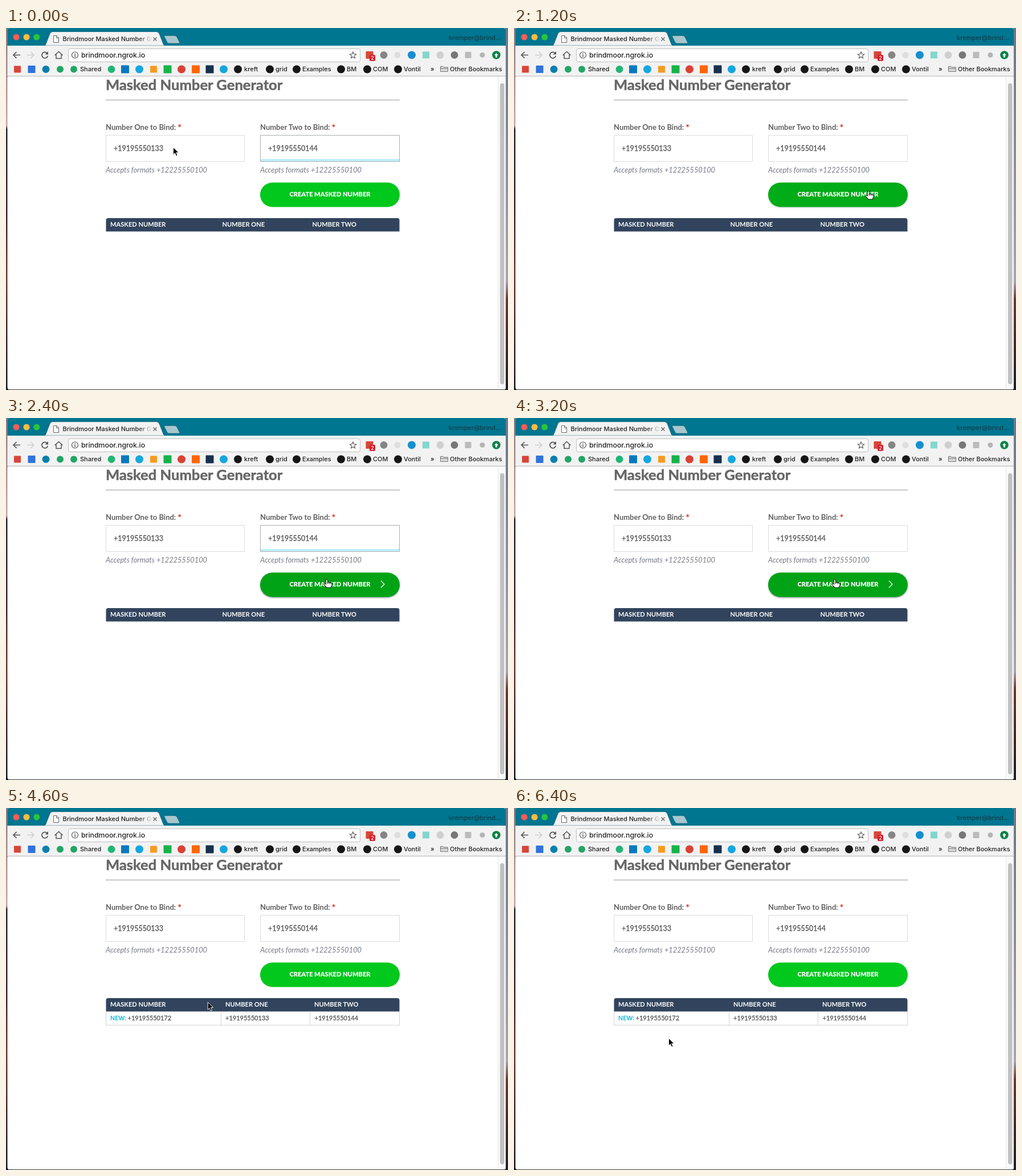
These frames come from a looping animation (881x636 px, 6.5 s). An HTML page:

```html
<!DOCTYPE html>
<html lang="en">
<head>
<meta charset="utf-8">
<title>Masked Number Generator</title>
<style>
  html, body { margin: 0; width: 100%; height: 100%; overflow: hidden; background: #fff; }
  svg { display: block; width: 100vw; height: 100vh; }
  .ui { font: 500 11px Inter, sans-serif; fill: #222; }
  .page { font: 12.5px Lato, sans-serif; fill: #555; }
  .title { font-size: 25.6px; font-weight: 700; fill: #666; stroke: #666; stroke-width: .5; }
  .label { font-size: 13px; font-weight: 700; fill: #606060; }
  .hint { font-size: 12.8px; font-style: italic; fill: #757c88; }
  .head { font-size: 11.1px; font-weight: 700; fill: #fff; }
  .value, .cell { stroke: #555; stroke-width: .3; }
  .cell { font-size: 11px; }
  .line { fill: none; stroke: #555; stroke-width: 1.7; }
</style>
</head>
<body>
<svg viewBox="0 0 881 636">
  <defs>
    <linearGradient id="leftDesk" x2="0" y2="1">
      <stop offset="0" stop-color="#8f7d80"/><stop offset=".27" stop-color="#c9a5a3"/>
      <stop offset=".28" stop-color="#272735"/><stop offset=".5" stop-color="#40262b"/>
      <stop offset=".68" stop-color="#713b32"/><stop offset="1" stop-color="#171b27"/>
    </linearGradient>
    <linearGradient id="rightDesk" x2="0" y2="1">
      <stop offset="0" stop-color="#68778d"/><stop offset=".7" stop-color="#a9a3b7"/>
      <stop offset=".75" stop-color="#70382f"/><stop offset=".88" stop-color="#48292a"/>
      <stop offset="1" stop-color="#1c2230"/>
    </linearGradient>
    <linearGradient id="tabFade">
      <stop offset="0" stop-color="#f2f2f2" stop-opacity="0"/><stop offset="1" stop-color="#f2f2f2"/>
    </linearGradient>
    <filter id="blur" x="-10%" y="-30%" width="120%" height="160%"><feGaussianBlur stdDeviation="1.2"/></filter>
  </defs>

  <!-- Window frame -->
  <rect width="4" height="636" fill="url(#leftDesk)"/>
  <rect x="876" width="5" height="636" fill="url(#rightDesk)"/>
  <rect x="2.5" y="84" width="874.5" height="551" rx="4" fill="#fff"/>
  <path d="M2.5 32V4q0-4 4-4H873q4 0 4 4V32Z" fill="#007690"/>
  <path d="M66 31Q69 31 70 28L77 10Q78.500 6.500 82 6.500H264Q267.500 6.500 269 10L276 28Q277 31 280 31Z" fill="#f2f2f2" stroke="#0b5c70" stroke-width=".8"/>
  <rect x="2.5" y="31" width="874.5" height="53" fill="#f2f2f2"/>
  <path d="M3 84.5H877" stroke="#b5b5b5"/>
  <path d="M4 635.5H876" stroke="#333"/>
  <rect x="863" y="85" width="14" height="549" fill="#fafafa"/>
  <path d="M863.5 85V634" stroke="#e7e7e7"/>
  <rect x="867" y="97" width="7.5" height="529" rx="3.7" fill="#c1c1c1"/>

  <!-- Tab strip -->
  <circle cx="18" cy="16" r="5.5" fill="#fc5b57"/>
  <circle cx="36" cy="16" r="5.5" fill="#fdbc40"/>
  <circle cx="53.7" cy="16" r="5.5" fill="#28c43c"/>
  <path d="M279 13.500H296Q299 13.500 300 16L304.500 25Q305.500 27 303 27H286Q283.500 27 282.500 24.500L278 15.500Q277 13.500 279 13.500Z" fill="#a8c6ce" stroke="#0b5c70" stroke-width=".6"/>
  <path d="M83.500 13.500H89L92.500 17V25.500H83.500ZM88.500 13.500V17.500H92.500" fill="#fff" stroke="#666"/>
  <g class="ui">
    <text x="99.5" y="23">Brindmoor Masked Number Ge</text>
    <rect x="232" y="10" width="25" height="17" fill="url(#tabFade)"/>
    <rect x="257" y="10" width="6" height="17" fill="#f2f2f2"/>
    <path d="M258.500 16.500L264.500 22.500M264.500 16.500L258.500 22.500" stroke="#666" stroke-width="1.4"/>
    <text x="777" y="20.500" style="fill:#123f4b">kremper@brind…</text>
  </g>

  <!-- Toolbar -->
  <path class="line" d="M25 47.500H13M18.500 42L13 47.500L18.500 53"/>
  <path class="line" d="M37 47.500H49M43.500 42L49 47.500L43.500 53" style="stroke:#cfcfcf"/>
  <path class="line" d="M72.500 44.500A5.300 5.300 0 1 0 73.300 49"/>
  <path d="M74 41V46.500H68.500Z" fill="#555"/>
  <path class="line" d="M85.500 48L92.500 41.500L99.500 48M88 46.500V53.500H97V46.500" style="stroke-width:1.5"/>
  <rect x="109.500" y="36.500" width="512" height="23" rx="3" fill="#fff" stroke="#bebebe"/>
  <circle class="line" cx="121" cy="47.500" r="5.500" style="stroke-width:1.2"/>
  <path d="M121 46.500V51M121 44V45.500" stroke="#555" stroke-width="1.4"/>
  <text class="ui" x="132" y="52" style="font-size:12.3px">brindmoor.ngrok.io</text>
  <path class="line" id="star" style="stroke-width:1.1"/>
  <g id="icons"></g>
  <rect x="638" y="47" width="10" height="11" rx="2" fill="#d4202c"/>
  <text class="ui" x="640.200" y="56" style="fill:#fff;font-size:9px">2</text>
  <path d="M860.500 44L864 48H862V51.500H859V48H857Z" fill="#fff"/>
  <g class="ui" id="bookmarks"></g>
  <path d="M762.500 76.500V67.500H767L768.500 69H775.500V76.500ZM762.500 71H775.500" fill="#d8d8d8" stroke="#777"/>

  <!-- Page -->
  <g class="page">
    <text class="title" x="175" y="109">Masked Number Generator</text>
    <path d="M175 126.500H691" stroke="#999"/>
    <g id="fields"></g>
    <g id="focus">
      <rect x="446.500" y="188.500" width="244" height="46" fill="none" stroke="#aaaeb2"/>
      <rect x="447" y="230" width="243" height="4" fill="#bff0fa"/>
    </g>
    <path id="caret" stroke="#333"/>
    <rect id="shadow" x="446" y="273" width="245" height="43" rx="21.500" fill="#345" filter="url(#blur)"/>
    <rect id="button" x="446" y="271.500" width="245" height="43" rx="21.500"/>
    <text x="568.500" y="296" text-anchor="middle" style="font-size:11.1px;font-weight:900;fill:#fff">CREATE MASKED NUMBER</text>
    <path id="chevron" d="M658 286L664 292L658 298" fill="none" stroke="#fff" stroke-width="1.200"/>
    <path d="M175.500 357.500V338Q175.500 334 179.500 334H686.500Q690.500 334 690.500 338V357.500Z" fill="#32445d"/>
    <text class="head" x="183" y="349">MASKED NUMBER</text>
    <text class="head" id="headOne" y="349">NUMBER ONE</text>
    <text class="head" id="headTwo" y="349">NUMBER TWO</text>
    <g id="row">
      <path d="M175.500 357.500V381.500H690.500V357.500M377.500 357.500V381.500M533.500 357.500V381.500" fill="none" stroke="#d5d5d5"/>
      <rect id="selection" x="213" y="362" width="79" height="15" fill="#91d8f8"/>
      <text x="183" y="373" style="font-size:10.6px;font-weight:700;fill:#08b9df">NEW:</text>
      <text class="cell" x="213.500" y="373">+19195550172</text>
      <text class="cell" x="385" y="373">+19195550133</text>
      <text class="cell" x="541.500" y="373">+19195550144</text>
    </g>
  </g>

  <!-- Pointer -->
  <g id="pointer">
    <circle id="ring" r="13.200" fill="#fff" fill-opacity=".25" stroke="#000" stroke-width="2.800"/>
    <path id="arrow" transform="translate(.5 .5)" d="M0 0V13L3 10.300L5.200 15.300L7.500 14.300L5.300 9.400H9.500Z" fill="#000" stroke="#fff" stroke-width=".9"/>
    <path id="hand" d="M-1.500 1.500Q0-1 1.500 1.500V6Q3 4.500 4.200 6Q5.500 5 6.700 6.700Q8.500 6 9 8V11L7 15H0L-5 9.500Q-5 7-2.500 8L-1.500 9ZM1.500 6V8.500M4.200 6V8.500M6.700 6.700V8.500" fill="#fff" stroke="#111" stroke-width="1.100"/>
    <path id="beam" d="M-3-7Q0-7 0-5Q0-7 3-7M0-5V5M-3 7Q0 7 0 5Q0 7 3 7M-1.500 2H1.500" fill="none" stroke="#222" stroke-width="1.200"/>
  </g>
</svg>
<script>
const $ = id => document.getElementById(id);
const show = (id, visible) => $(id).setAttribute('visibility', visible ? 'visible' : 'hidden');
const set = (id, attrs) => { for (const key in attrs) $(id).setAttribute(key, attrs[key]); };
const clamp = v => Math.min(1, Math.max(0, v));
const within = (t, spans) => spans.some(([from, to]) => t >= from && t < to);

const icon = ([shape, x, color, size = 13], y) => shape === 'o'
  ? `<circle cx="${x}" cy="${y}" r="${size / 2}" fill="${color}"/>`
  : `<rect x="${x - size / 2}" y="${y - size / 2}" width="${size}" height="${size}" rx="1" fill="${color}"/>`;

const extensions = [
  ['s', 638, '#d8453a'], ['o', 663, '#858585'], ['o', 687, '#dedede', 11], ['o', 712, '#168fcf', 14],
  ['s', 737, '#83d6ce', 12], ['o', 762, '#d0d0d0'], ['o', 787, '#777'], ['s', 811, '#bbb', 11],
  ['o', 836, '#b5b5b5', 9], ['o', 860.5, '#078347', 14.5]
];
const favicons = [
  ['s', 20, '#d8453a', 12], ['s', 45, '#2f73dc'], ['o', 70, '#087fae'], ['o', 95, '#22a565', 12],
  ['o', 119, '#22a565', 12], ['o', 185, '#20b575'], ['s', 209, '#0879bf', 14], ['o', 234, '#16a6df', 14],
  ['s', 259, '#f69b20', 12], ['s', 283.5, '#16b34a', 14], ['o', 308, '#da4135', 14], ['s', 333, '#ff6600', 14],
  ['s', 357.5, '#17304d', 14], ['o', 382, '#16a6df', 14],
  ...[407, 463, 510, 588, 634, 688].map(x => ['o', x, '#161616', 14])
];
const bookmarks = [
  [130, 'Shared'], [418, 'kreft'], [473, 'grid'], [520, 'Examples'], [598, 'BM'],
  [644, 'COM'], [698, 'Vontil'], [745, '»'], [779, 'Other Bookmarks']
];
$('icons').innerHTML = extensions.map(e => icon(e, 47.5)).join('');
$('bookmarks').innerHTML = favicons.map(f => icon(f, 72.5)).join('') +
  bookmarks.map(([x, name]) => `<text x="${x}" y="76">${name}</text>`).join('');

const starPoints = Array.from({ length: 10 }, (_, i) => {
  const angle = i * Math.PI / 5 - Math.PI / 2, radius = i % 2 ? 2.7 : 6;
  return `${609 + radius * Math.cos(angle)} ${48 + radius * Math.sin(angle)}`;
});
set('star', { d: `M${starPoints.join('L')}Z` });

const field = (x, width, name, value) => `
  <text class="label" x="${x}" y="178.500">Number ${name} to Bind: <tspan fill="#e2351f" font-size="15" font-weight="900" dy="1">*</tspan></text>
  <rect x="${x + .5}" y="188.500" width="${width}" height="46" fill="#fff" stroke="#dcdcdc"/>
  <text class="value" id="value${name}" x="${x + 14}" y="215.500">${value}</text>
  <text class="hint" x="${x}" y="253.500">Accepts formats +12225550100</text>`;
$('fields').innerHTML = field(175, 243, 'One', '+19195550133') + field(446, 244, 'Two', '+19195550144');

// Pointer stops: time, x, y
const path = [
  [0, 293, 209], [350, 293, 209], [950, 600, 280], [1200, 622, 286], [1500, 575, 212],
  [1650, 570, 215], [1900, 563, 279], [2100, 563, 283], [4150, 563, 283], [4900, 240, 372],
  [5100, 223, 373], [5700, 223, 373], [6100, 271, 404], [6500, 271, 404]
];
const hovers = [[950, 1300], [1760, 4150]];
const presses = [[1500, 1600], [2500, 2600], [5100, 5300], [6100, 6200]];

function pointerAt(t) {
  const i = path.findIndex(stop => stop[0] > t);
  const [t0, x0, y0] = path[i - 1], [t1, x1, y1] = path[i];
  const u = (t - t0) / (t1 - t0), eased = u * u * (3 - 2 * u);
  return [x0 + (x1 - x0) * eased, y0 + (y1 - y0) * eased];
}

const hoverAt = t => Math.max(...hovers.map(([from, to]) =>
  clamp((t - from) / 330) * clamp(1 - (t - to) / 300)));

function draw(t) {
  const [x, y] = pointerAt(t);
  const hover = hoverAt(t);
  const focused = within(t, [[0, 900], [1500, 2500]]);
  const hasRow = t >= 3500;

  const overButton = x >= 446 && x <= 691 && y >= 271 && y <= 314;
  const overText = (x >= 446 && y >= 189 && y <= 234) || (t > 4200 && x < 292 && y >= 362 && y <= 377);
  set('pointer', { transform: `translate(${x} ${y})` });
  show('hand', overButton);
  show('beam', overText);
  show('arrow', !overButton && !overText);
  show('ring', within(t, presses));

  show('focus', focused);
  show('caret', focused && Math.floor(t / 500) % 2 === 1);
  const caretX = 461 + $('valueTwo').getComputedTextLength();
  set('caret', { d: `M${caretX} 203V219` });

  set('button', { fill: `rgb(0, ${200 - 37 * hover}, ${28 - 6 * hover})` });
  set('shadow', { opacity: .5 * hover ** 3 });
  set('chevron', { opacity: clamp(hover * 5 - 4) });

  show('row', hasRow);
  show('selection', within(t, [[5200, 6100]]));
  set('headOne', { x: hasRow ? 385 : 379.5 });
  set('headTwo', { x: hasRow ? 541 : 537.5 });
}

const start = performance.now();
function tick() {
  const elapsed = (performance.now() - start) % 6500;
  draw(Math.floor(elapsed / 100) * 100);
  requestAnimationFrame(tick);
}
tick();
</script>
</body>
</html>
```
